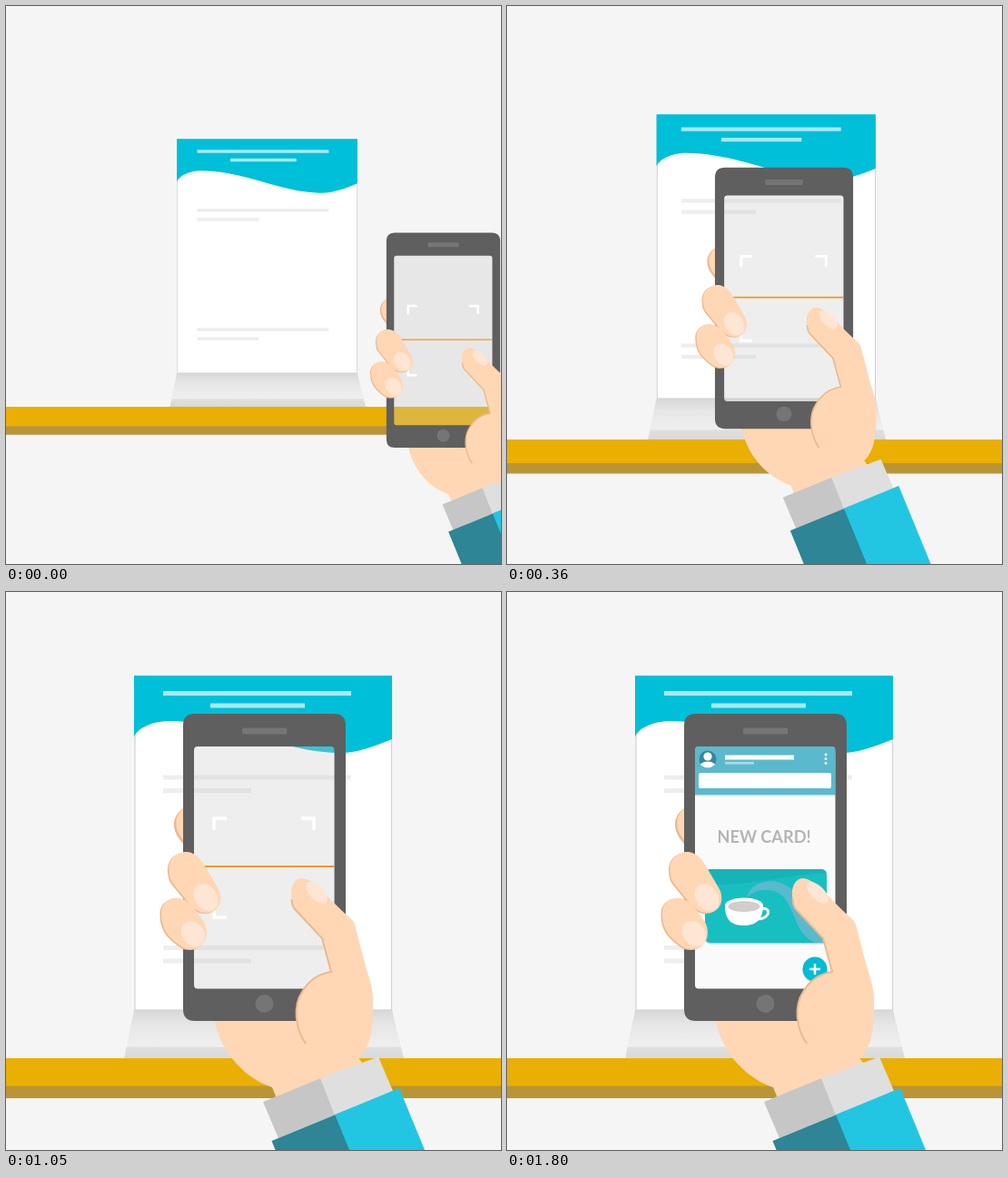
These frames come from a looping animation (545 by 614 pixels, 4.05 s). An HTML page:

```html
<!DOCTYPE html>
<html lang="en">
<head>
<meta charset="utf-8">
<title>Scan a poster, get a card</title>
<style>
html, body { margin: 0; width: 100%; height: 100%; overflow: hidden; background: #f5f5f5; }
svg { display: block; }
.skin { fill: #ffd7b5; }
.shade { fill: #e9ba90; }
.nail { fill: #ffe5d3; }
.grey { fill: #eee; }
</style>
</head>
<body>
<svg width="545" height="614" viewBox="0 0 545 614">
  <defs>
    <linearGradient id="foot" x2="0" y2="1">
      <stop stop-color="#d8d8d8"/>
      <stop offset=".3" stop-color="#e6e6e6"/>
      <stop offset=".75" stop-color="#efefef"/>
      <stop offset=".78" stop-color="#dfdfdf"/>
      <stop offset="1" stop-color="#d9d9d9"/>
    </linearGradient>
    <clipPath id="screen"><rect x="207" y="170" width="154.5" height="266.5" rx="4"/></clipPath>
    <clipPath id="cardShape"><rect x="218" y="305" width="134" height="81" rx="6"/></clipPath>
    <path id="middle" d="M180 310C177 295 187 285 200 286C208 287 214 293 218 300L234 327C240 340 234 353 220 353C212 353 207 348 202 343L184 321Q180 316 180 310Z"/>
    <path id="ring" d="M171 355C170 342 180 335 191 337C198 338 204 344 208 349L218 363C225 377 219 392 205 393C196 394 190 388 184 383Q171 372 171 355Z"/>
  </defs>

  <g id="scene">
    <path fill="#e9af02" d="M-200 513H900V544H-200Z"/>
    <path fill="#b99535" d="M-200 543.5H900V557H-200Z"/>
    <path fill="url(#foot)" d="M141 460H425L438 513H130Z"/>
    <rect x="142" y="93" width="282.5" height="367" fill="#fff" stroke="#d2d2d2" stroke-width="1.2"/>
    <path fill="#00bfd8" d="M141 92H425V162C405 170 385 178 365 177C300 175 250 143 180 142C160 142 143 151 141 160Z"/>
    <path fill="#a8e8f1" d="M173 109h207v5h-207zM225 122.5h104v5h-104z"/>
    <path class="grey" d="M173 201.5h207v5h-207zM173 216h97v5h-97zM173 389h207v5h-207zM173 403.5h97v5h-97z"/>
  </g>

  <g id="phone">
    <path class="shade" d="M198 236C181 246 180 263 198 280Z"/>
    <path class="skin" d="M198 236C184 246 183 261 198 276Z"/>
    <path class="skin" d="M229 468C235 505 262 535 293 545L300 562L396 522L387 512C400 500 404 470 404 455L360 440Z"/>

    <rect x="207" y="170" width="154.5" height="266.5" fill="#c6c6c6" fill-opacity=".3"/>
    <path fill="none" stroke="#fff" stroke-width="3.5" d="M229 262V249H243M325 249H339V262M229 345V358H243"/>
    <path stroke="#f29a1f" stroke-width="2" d="M207 302H361"/>

    <g id="app" clip-path="url(#screen)">
      <path fill="#fafafa" d="M207 170h155v267h-155z"/>
      <path fill="#dcdcdc" d="M207 222h155v2.5h-155z"/>
      <path fill="#5bb9cd" d="M207 170h155v53h-155z"/>
      <circle cx="221" cy="184" r="9.5" fill="#3a8796"/>
      <circle cx="221" cy="181" r="4.6" fill="#fff"/>
      <path fill="#fff" d="M213 190Q215 186.500 221 186.500T229 190Q221 197 213 190Z"/>
      <path fill="#fff" d="M240 179.500h76v5h-76z"/>
      <path fill="#a9dbe5" d="M240 187h32v2.500h-32z"/>
      <path stroke="#fff" stroke-width="2.800" stroke-linecap="round" stroke-dasharray="0 4.700" d="M351 179v10"/>
      <rect x="211" y="199" width="146" height="17" rx="2" fill="#fff"/>
      <text x="283" y="276" text-anchor="middle" font-family="Lato, sans-serif" font-weight="700" font-size="18.200" fill="#b5b5b5">NEW CARD!</text>
      <g id="card">
        <rect x="218" y="306.500" width="134" height="81" rx="6" fill="#000" opacity=".18"/>
        <g clip-path="url(#cardShape)">
          <path fill="#18bfc0" d="M218 305h134v81h-134z"/>
          <path fill="#16b4b9" d="M218 305H352V309C310 311 265 324 218 322Z"/>
          <path fill="#5bb9cd" d="M264 336C268 318 295 312 312 326C325 340 335 352 352 362V386H340C318 378 318 352 305 336C295 325 275 325 264 336Z"/>
        </g>
        <path fill="none" stroke="#fff" stroke-width="3" d="M279 349C291 345 291 360 275 360"/>
        <path fill="#fff" d="M240 345C240 360 246 367 261 367C276 367 282 358 282 345Z"/>
        <ellipse cx="261" cy="345" rx="21" ry="8.500" fill="#fff"/>
        <ellipse cx="261" cy="346" rx="17.500" ry="6" fill="#d3cccc"/>
      </g>
      <circle cx="339" cy="416.500" r="13.500" fill="#000" opacity=".15"/>
      <circle cx="339" cy="415" r="13.500" fill="#00bcd4"/>
      <path stroke="#fff" stroke-width="2.500" d="M333 415h12M339 409v12"/>
    </g>

    <path fill="#5f5f5f" fill-rule="evenodd" d="M208 134H361Q374 134 374 147V459Q374 472 361 472H208Q195 472 195 459V147Q195 134 208 134ZM211 170Q207 170 207 174V432.500Q207 436.500 211 436.500H357.500Q361.500 436.500 361.500 432.500V174Q361.500 170 357.500 170Z"/>
    <rect x="260" y="149.500" width="49" height="7" rx="1.500" fill="#757575"/>
    <circle cx="284.500" cy="453" r="10" fill="#757575"/>

    <use href="#middle" class="shade" x="-1.500" y="1"/>
    <use href="#middle" class="skin"/>
    <ellipse class="nail" cx="220" cy="336" rx="12" ry="16" transform="rotate(-35 220 336)"/>
    <use href="#ring" class="shade" x="-1.500" y="1"/>
    <use href="#ring" class="skin"/>
    <ellipse class="nail" cx="206" cy="376" rx="12" ry="15" transform="rotate(-35 206 376)"/>

    <path class="skin" d="M315 340C311 325 318 314 327 315C342 318 352 335 378 358Q382 361 384 366L396 412C402 430 405 442 404 455C404 480 402 500 388 514L330 497C318 480 316 455 326 440C334 426 345 420 358 418L348 381L318 349Q316 346 315 340Z"/>
    <path fill="none" stroke="#e9ba90" stroke-width="2" d="M314.500 338Q315 346 318 349L348 381L358 418C345 420 334 426 326 440C316 455 318 480 330 497"/>
    <ellipse class="nail" cx="342" cy="331" rx="15" ry="7.500" transform="rotate(45 342 331)"/>

    <path fill="#c6c6c6" d="M283 561L346.500 535L363 575L300 601Z"/>
    <path fill="#dfdfdf" d="M346 535L410 511.500L426 549L362 576Z"/>
    <path fill="#2d8596" d="M292.500 604L363 575L433 745L362 774Z"/>
    <path fill="#22c6e2" d="M362 575L433 546L503 716L432 745Z"/>
  </g>
</svg>
<script>
const LOOP = 4050, STEP = 30;
const $ = id => document.getElementById(id);

// Smooth 0..1 progress between two times
const ease = (t, from, to) => {
  const u = Math.min(1, Math.max(0, (t - from) / (to - from)));
  return u * u * (3 - 2 * u);
};

// Remaining distance along a quadratic curve with control value c
const remain = (u, c) => (1 - u) ** 2 + 2 * u * (1 - u) * c;

const place = (id, x, y, s, ax, ay) =>
  $(id).setAttribute('transform', `translate(${x} ${y}) scale(${s}) translate(${-ax} ${-ay})`);

function draw(t) {
  const zoom = 0.7 + 0.3 * ease(t, 120, 600);
  place('scene', 298, 273, zoom, 298, 273);

  const u = ease(t, 0, 460);
  place('phone', 284.5 + 197 * remain(u, 0.42), 303 + 64.8 * remain(u, 1.27), zoom, 284.5, 303);

  $('app').setAttribute('opacity', ease(t, 1050, 1230));
  const pop = 1.07 * ease(t, 1080, 1320) - 0.09 * ease(t, 1320, 1560) + 0.02 * ease(t, 1560, 1800);
  place('card', 285, 345.5, pop, 285, 345.5);
}

const start = performance.now();
function tick() {
  const t = (performance.now() - start) % LOOP;
  draw(Math.floor(t / STEP) * STEP);
  requestAnimationFrame(tick);
}
tick();
</script>
</body>
</html>
```
